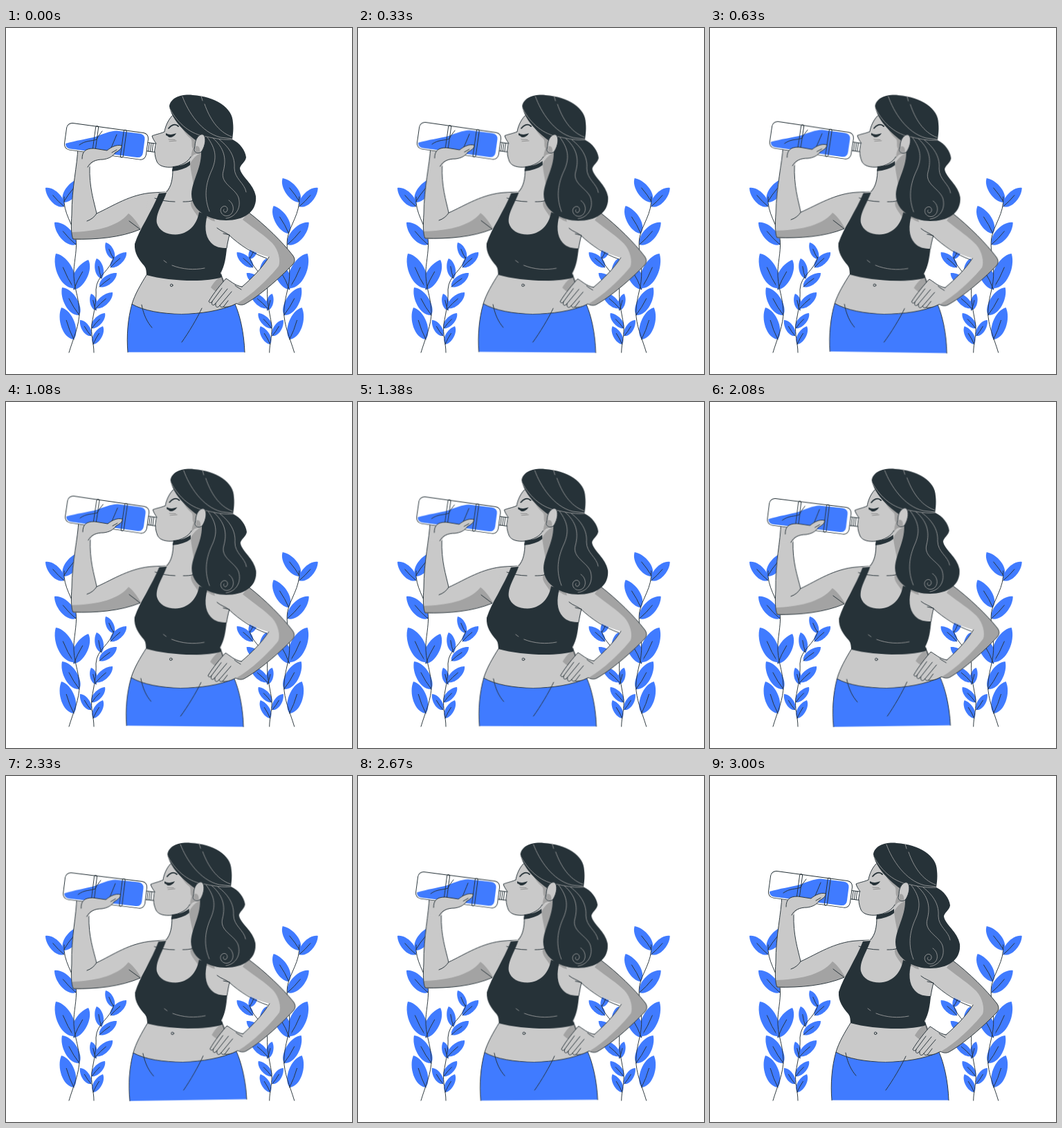
An HTML page that plays this animation: 500x500 px, repeating every 3.04 s.

```html
<!DOCTYPE html>
<html lang="en">
<head>
<meta charset="utf-8">
<title>Drinking water</title>
<style>
html, body { margin: 0; width: 100%; height: 100%; overflow: hidden; background: #fff; }
svg { display: block; width: 100%; height: 100%; }
#person { transform-origin: 251px 283px; }
path, rect, circle { stroke-linecap: round; stroke-linejoin: round; }
.line { fill: none; stroke: #263238; stroke-width: .95; }
.skin { fill: #c9c9c9; }
.shade { fill: #a3a3a3; }
.dark { fill: #263238; }
.blue { fill: #407bff; }
.edge { stroke: #263238; stroke-width: .95; }
.hairline { fill: none; stroke: #a6a6a6; stroke-width: .8; }
</style>
</head>
<body>
<svg viewBox="0 0 500 500">
  <g id="plants"></g>
  <g id="plantsMirror" transform="translate(507.7 0) scale(-1 1)"></g>

  <g id="person">
    <!-- raised arm -->
    <path class="skin" d="M104 172C103 200 95 230 95 270C94 285 94 299 97 305C130 306 165 303 194 291L240 300L240 238L212 238C180 240 155 257 131 268C127 250 120 230 121 200L124 172Z"/>
    <path class="shade" d="M95 295C125 294 160 289 177 268C185 274 190 282 195 290C165 303 128 305 98 306C95 303 95 299 95 295Z"/>
    <path class="line" d="M104 172C103 200 95 230 95 270C94 285 94 299 97 305C130 306 165 303 194 291L178 279M230 237L212 238C180 240 155 257 131 268C127 250 120 230 121 200M131 268C128 273 123 277 117 279"/>

    <!-- torso and neck -->
    <path class="skin" d="M206 240L229 237C238 232 241 220 241 195L282 180L300 265L345 265L323 299L319 320L311 356C313 374 325 385 331 400L331 412L182 412L182 399C186 385 195 370 203 357L198 300Z"/>
    <path class="shade" d="M266 196C272 185 280 180 284 182L300 275L279 275C272 264 263 256 269 248C276 236 268 218 266 196Z"/>
    <path class="shade" d="M290 273C298 281 311 282 320 276L300 270ZM312 358C305 362 299 369 296 375C302 381 307 383 309 382L318 370Z"/>
    <path class="line" d="M241 204C241 218 239 229 232 237M215 246C224 249 234 251 244 251M256 251C261 251 266 251 272 249"/>
    <path class="line" d="M203 357C195 370 186 385 182 399M311 356C312 362 314 367 316 371"/>
    <circle class="line" cx="239.2" cy="371.8" r="1.8"/>

    <!-- leggings -->
    <path class="blue" d="M182 399C215 418 290 418 331 399C338 415 344 440 345 468.5L176 468.5C174 445 176 420 182 399Z"/>
    <path class="line" d="M176 468.5C174 445 176 420 182 399C215 418 290 418 331 399C338 415 344 440 345 468.5M196 400C199 415 204 425 211 433M283 405C276 420 264 440 254 454"/>

    <!-- arm on the hip -->
    <path class="skin" d="M300 272L350 266C375 285 400 310 414 328C418 333 418 338 414 342C395 362 365 388 345 399C341 401 336 400 333 398C326 402 319 403 314 404L306 403L299 401L293 396C300 383 311 370 318 362C324 365 330 372 341 374C355 362 370 347 380 331C360 326 338 314 322 299L305 291Z"/>
    <path class="shade" d="M350 266C375 285 400 310 414 328C418 333 418 338 414 342C395 362 365 388 345 399C341 401 338 400 334 398C355 386 380 362 394 344C397 336 394 321 385 311C374 300 360 291 342 277Z"/>
    <path class="line" d="M350 266C375 285 400 310 414 328C418 333 418 338 414 342C395 362 365 388 345 399C341 401 336 400 333 398C326 402 319 404 314 403M341 374C355 362 370 347 380 331M377 333C357 326 338 314 322 299C317 295 311 294 305 289M314 297L323 299C321 306 320 312 319 318"/>
    <path class="line" d="M341 374C330 372 324 365 318 362C311 370 300 383 293 395C294 398 297 397 298 395L312 376M298 395C296 400 299 402 302 399L320 377M303 398C302 404 306 405 309 401L326 381M309 401C310 404 313 404 315 402L321 394M331 372C333 374 337 376 340 378"/>

    <!-- sports top -->
    <path class="dark" d="M221 239L232 238C226 255 216 268 218 282C221 293 232 298.5 245 298.5C263 298 276 285 279 266L291 270C287 285 287 300 296 310C302 317 311 318 319 318C318 330 316 345 310 354L312 360C290 368 235 366 203 357C203 350 202 347 200 344C192 335 185 325 186 312C190 300 195 290 202 278C209 264 216 252 221 239Z"/>
    <path class="hairline" d="M228 336L232 339M240 343C255 349 272 350 287 347"/>

    <!-- face -->
    <path class="skin" d="M243 123C234 132 230 143 229 150C222 153 215 154 211 156C212 160 215 164 217 167L215 179C215 184 216 188 218 193C221 200 231 202 241 201C255 199 264 195 268 184L284 180L284 150Z"/>
    <path class="shade" d="M243 126C252 138 255 150 267 160C270 164 267 170 270 174C268 180 267 186 267 189C268 186 272 181 282 182L284 155L262 138Z"/>
    <path class="line" d="M240 127C234 133 230 143 229 150C222 153 215 154 211 156C212 160 215 164 217 167M215 179C215 184 216 188 218 193C221 200 231 202 241 201C253 199 263 194 267 186"/>
    <path class="dark" d="M241 200C250 200 260 197 266 192L266 198C260 203 250 206 240 207Z"/>
    <path class="dark" d="M231 152C236 155 241 154 246 152C244 156 240 158 237 158C234 158 235 156 231 155Z"/>
    <path class="line" stroke-width="1.8" style="stroke-width:1.8" d="M235 145C238 141 244 137 249 142"/>
    <path class="line" style="stroke:#777;stroke-width:.7" d="M235 161L244 161.5M236 163.8L246 163"/>

    <!-- hair -->
    <path class="dark" d="M236 113C238 100 255 95 270 97C302 99 328 115 328 137C329 146 328 153 327 161C338 166 346 177 347 187C346 194 338 198 338 203C340 215 358 225 361 243C363 265 345 278 318 278C295 278 268 265 268 240C269 220 283 202 282 178L274 162C258 150 239 132 236 113Z"/>
    <path class="hairline" d="M255 99C263 121 282 151 310 158L327 160M282 98L284 105M287 110C294 130 306 150 326 157M237 117C249 139 267 154 290 157C303 160 315 162 327 161"/>
    <path class="hairline" d="M291 158C303 174 305 187 298 204C291 219 284 240 294 265M299 159C315 173 319 188 314 207C309 225 331 231 336 245C341 263 329 274 318 275M308 161C325 174 331 188 330 202C330 218 345 224 347 237"/>
    <path class="hairline" d="M322 249C330 254 331 267 322 271C313 274 307 264 312 259C318 254 323 262 318 266C315 267 313 264 315 262"/>
    <path class="skin edge" d="M273 170C273 161 279 152 285 154C290 158 288 170 283 178C280 182 272 181 272 176Z"/>
    <path class="shade" d="M274 171C278 169 281 173 280 179C275 181 272 179 274 171Z"/>

    <!-- bottle -->
    <g transform="translate(145 163.8) rotate(7.8)">
      <rect x="59" y="-6.5" width="12" height="12.5" fill="#fff" class="edge"/>
      <path class="line" d="M62 -6V6M64.8 -6V6M67.5 -6V6"/>
      <rect x="-59.5" y="-19.5" width="119" height="39" rx="8" fill="#fff" class="edge"/>
    </g>
    <path class="blue" d="M86 167C100 163 118 160 130 157C140 153 150 149 160 148.5L193 152.5Q201 153.5 200.5 161L198 180Q197 188 189 187L92 174.5Q86 173 86 167Z"/>
    <g class="line" transform="translate(145 163.8) rotate(7.8)">
      <rect x="-18" y="-20" width="4" height="40" rx="2"/>
      <rect x="23" y="-20" width="4" height="40" rx="2"/>
    </g>
    <path class="line" d="M106 169C115 162 124 164 131 161C133 156 137 152 139 149M160 154C157 161 154 169 151 175"/>

    <!-- gripping hand -->
    <path class="skin" d="M105 179L110 188C110 179 114 174 127 174L146 177C152 172 160 168 167 170C168 174 162 178 158 180C154 186 148 189 140 190C130 190 123 194 121 201L103 200Z"/>
    <path class="line" d="M110 189C110 179 114 174 127 174L146 177C152 172 160 168 167 170C168 174 162 178 158 180C154 186 148 189 140 190C130 190 122 193 118 201M153 180L160 176"/>
  </g>
</svg>
<script>
// Each leaf: tip x, tip y, base x, base y.
const bigLeaves = [
  [108, 217, 83, 252], [57, 231, 84, 258], [121, 257, 99, 297], [70, 281, 101, 313],
  [72, 326, 98, 376], [119, 335, 98, 378], [81, 375, 106, 415], [80, 404, 98, 450]
];
const smallLeaves = [
  [144, 310, 156, 334], [174, 324, 151, 346], [131, 333, 138, 362], [160, 354, 135, 374],
  [123, 384, 130, 408], [154, 382, 130, 405], [143, 412, 124, 434], [107, 422, 123, 445],
  [140, 431, 126, 457]
];
const stems =
  "M91 469C98 446 106 430 106 410C105 385 97 375 98 350C99 335 103 318 101 304C98 285 82 268 84 244" +
  "M127 469C127 455 122 442 124 428C127 410 131 395 130 378C131 357 150 352 156 331";

function leaf([tx, ty, bx, by]) {
  const dx = bx - tx, dy = by - ty;
  const at = (along, side) =>
    `${(tx + along * dx - side * dy).toFixed(1)} ${(ty + along * dy + side * dx).toFixed(1)}`;
  return `<path class="blue" d="M${at(0, 0)}C${at(.25, .25)} ${at(.85, .3)} ${at(1, 0)}` +
    `C${at(.85, -.26)} ${at(.2, -.28)} ${at(0, 0)}Z"/>` +
    `<path class="line" d="M${at(.4, 0)}Q${at(.7, .03)} ${at(1, 0)}"/>`;
}

const art = [...bigLeaves, ...smallLeaves].map(leaf).join("") + `<path class="line" d="${stems}"/>`;
for (const id of ["plants", "plantsMirror"]) document.getElementById(id).innerHTML = art;

// Gentle sway: time in ms, angle in degrees.
const loop = 3040;
const sway = [[0, 0], [750, 1], [2250, -1], [3000, 0], [loop, 0]];
document.getElementById("person").animate(
  sway.map(([ms, deg]) => ({ offset: ms / loop, transform: `rotate(${deg}deg)` })),
  { duration: loop, iterations: Infinity }
);
</script>
</body>
</html>
```
